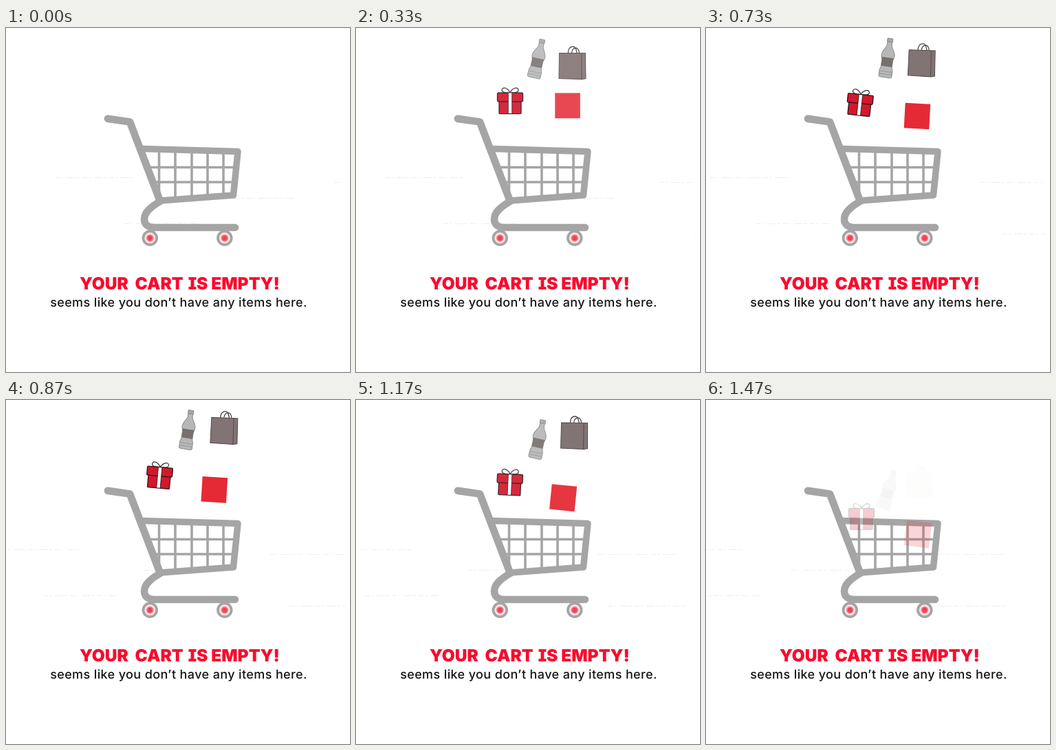
Recreate the animation shown at these times as an HTML page. Size 500 px wide and 500 px high, loop 1510 ms.

```html
<!DOCTYPE html>
<html lang="en">
<head>
<meta charset="utf-8">
<title>Empty cart</title>
<style>
  html, body { margin: 0; width: 100%; height: 100%; overflow: hidden; background: #fff; }
  svg { display: block; width: 100vw; height: 100vh; }
  .title { font: 900 24.5px Inter, "Open Sans", sans-serif; font-feature-settings: "cv08"; fill: #fb0a2e; }
  .note { font: 500 18px Inter, "Open Sans", sans-serif; letter-spacing: .38px; fill: #151515; }
</style>
</head>
<body>
<svg viewBox="0 0 500 500" text-rendering="geometricPrecision">
  <defs>
    <clipPath id="view"><rect x="3" y="0" width="490" height="500"/></clipPath>
    <g id="wheel">
      <circle r="11.7" fill="#a4a4a4"/>
      <circle r="8" fill="#fbe3e4"/>
      <circle r="5.4" fill="#f4808a"/>
      <circle r="3.6" fill="#ee4456"/>
    </g>
  </defs>

  <g id="streaks" clip-path="url(#view)" stroke="#ededed" stroke-dasharray="7 3 2 5 12 2 4 4" fill="none"/>

  <g fill="none" stroke="#a5a5a5" stroke-linecap="round" stroke-linejoin="round">
    <path fill="#fff" stroke="none" d="M196 176H337L331 243L224 251Z"/>
    <path stroke-width="3.6" d="M222.500 178V246M246 178V246M270 178V245M293 179V244M316 179V243M207 202.500H334M215 224H332"/>
    <path stroke-width="9.500" d="M197 175.500L337 179.500L330.500 243L224 251"/>
    <path stroke-width="10.800" d="M148 131.800L180 136.500L223 249"/>
    <path stroke-width="10.500" d="M225 251.500C210 260 201 268 201 278C201 286 207 290 215 290H333"/>
  </g>
  <use href="#wheel" x="209.300" y="305.300"/>
  <use href="#wheel" x="317.800" y="305.300"/>

  <g id="bottle">
    <path fill="#b7b7b7" stroke="#8d8d8d" d="M-3.500 -24V-19C-4 -15 -9 -11 -9.500 -5C-10 -2 -8 0 -8 3V12C-8 15 -9.500 16 -9.500 19V26Q-9.500 28 -7 28H7Q9.500 28 9.500 26V19C9.500 16 8 15 8 12V3C8 0 10 -2 9.500 -5C9 -11 4 -15 3.500 -19V-24Z"/>
    <rect x="-4" y="-29" width="8" height="5" rx="1" fill="#a8a8a8" stroke="#8d8d8d"/>
    <path fill="#77706f" d="M-9 -1H9L8 3V12H-8V3Z"/>
    <path fill="none" stroke="#999" d="M-9 19.500H9M-9 23.500H9"/>
  </g>

  <g id="bag">
    <path class="trim" fill="none" stroke="#4b4546" stroke-width="1.300" d="M-6 -15V-21Q-5 -28 1 -28Q6 -28 7 -15M-1 -19Q0 -26 5 -26Q9 -26 10 -19"/>
    <path class="body" d="M-19 -18.500H19L19.500 18.500L14 19.500L-19.500 18.500Z"/>
    <path class="trim" fill="none" stroke="#514a4b" d="M-19 -18.500H19L19.500 18.500L14 19.500L-19.500 18.500ZM13.500 -18V19"/>
  </g>

  <g id="gift">
    <path fill="#fff" stroke="#333" stroke-width="1.200" d="M0 -15C-5 -23 -12 -23 -12 -18C-12 -15 -6 -14 0 -14.500C6 -14 12 -15 12 -18C12 -23 5 -23 0 -15Z"/>
    <g fill="#d3182d" stroke="#2a1719" stroke-width="1.300" stroke-linejoin="round">
      <rect x="-16" y="-2" width="32" height="18" rx="1"/>
      <rect x="-18.500" y="-14.500" width="37" height="13" rx="1.500"/>
    </g>
    <path fill="#fff" d="M-2.700 -14H2.700V15.500H-2.700Z"/>
    <path fill="none" stroke="#2a1719" stroke-width=".8" d="M-2.700 -14V15.500M2.700 -14V15.500"/>
  </g>

  <rect id="tile" x="-18.300" y="-18.300" width="36.600" height="36.600" fill="#e52a35"/>

  <g class="title" text-anchor="middle">
    <text x="142.500" y="379.500">YOUR</text>
    <text x="222.500" y="379.500">CART</text>
    <text x="279" y="379.500">IS</text>
    <text x="348" y="379.500">EMPTY!</text>
  </g>
  <text class="note" x="251" y="405" text-anchor="middle">seems like you don’t have any items here.</text>
</svg>

<script>
const LOOP = 1510, FPS = 30, LAST = 44;
const times = [0, 330, 530, 730, 1000, 1330, 1470];

const items = {
  bottle: {
    x: [266, 264.500, 263.500, 264, 265.500, 266, 265],
    y: [-30, 45, 44.500, 44, 43.500, 86, 132],
    turn: [16, 13, 11, 8, 10, 15, 17],
    fade: [0, .88, 1, 1, 1, .75, .05]
  },
  bag: {
    x: [316, 314.500, 311, 313.500, 319.500, 313.500, 310],
    y: [-30, 55, 55, 51, 40, 77, 125],
    turn: [-2, 0, 3, 2, 2.500, -2, -4],
    fade: [0, .9, 1, 1, 1, 1, 0]
  },
  gift: {
    x: [223, 224, 225, 223.500, 222.500, 225, 226],
    y: [30, 108.500, 110, 111, 114, 138, 173],
    turn: [-3, 0, 2, 6, 4, 1, 0],
    fade: [0, .92, 1, 1, 1, .75, .2]
  },
  tile: {
    x: [304, 307.500, 310, 307, 300, 303.500, 308],
    y: [30, 112.500, 126, 128, 134, 156.500, 196],
    turn: [-2, 0, 1, 3, 4, 7, 7],
    fade: [0, .85, 1, 1, 1, .8, .18]
  }
};

// start x, y, length, speed in px per second
const lines = [
  [72, 217, 113, 91],
  [477, 224, 113, 108],
  [311, 247, 109, 128],
  [172, 284, 108, 136],
  [541, 299, 115, 150]
];

const $ = s => document.querySelector(s);
const clamp = v => Math.max(0, Math.min(1, v));

// Smooth curve through the keys that never overshoots them
function track(v, t) {
  let i = 0;
  while (i < times.length - 2 && t >= times[i + 1]) i++;
  const slope = k => (v[k + 1] - v[k]) / (times[k + 1] - times[k]);
  const tangent = k => {
    if (k === 0) return slope(0);
    if (k === times.length - 1) return slope(k - 1);
    const a = slope(k - 1), b = slope(k);
    return a * b <= 0 ? 0 : 2 * a * b / (a + b);
  };
  const h = times[i + 1] - times[i];
  const u = clamp((t - times[i]) / h), w = 1 - u;
  return v[i] * (1 + 2 * u) * w * w + v[i + 1] * u * u * (3 - 2 * u)
    + h * u * w * (tangent(i) * w - tangent(i + 1) * u);
}

const mix = (a, b, k) => `rgb(${a.map((n, i) => Math.round(n + (b[i] - n) * k))})`;

const streaks = lines.map(() => {
  const p = document.createElementNS("http://www.w3.org/2000/svg", "path");
  $("#streaks").append(p);
  return p;
});
const nodes = Object.entries(items).map(([id, keys]) => [$("#" + id), keys]);
const bagBody = $("#bag .body"), bagTrim = document.querySelectorAll("#bag .trim");

function draw(ms) {
  const step = Math.min(LAST, Math.floor((ms + 4) * FPS / 1000));
  const t = step * 1000 / FPS;

  lines.forEach(([x, y, len, speed], i) => {
    const left = x - speed * t / 1000;
    streaks[i].setAttribute("d", `M${left.toFixed(1)} ${y + .5}h${len}`);
  });

  for (const [node, k] of nodes) {
    const [x, y, turn] = [k.x, k.y, k.turn].map(v => track(v, t).toFixed(2));
    node.setAttribute("transform", `translate(${x} ${y}) rotate(${turn})`);
    node.setAttribute("opacity", track(k.fade, t).toFixed(3));
  }

  const green = clamp((t - 1230) / 90);
  bagBody.setAttribute("fill", mix([130, 115, 116], [189, 213, 149], green));
  bagTrim[1].setAttribute("opacity", 1 - green * .8);
}

function tick() {
  draw(performance.now() % LOOP);
  requestAnimationFrame(tick);
}
tick();
</script>
</body>
</html>
```
